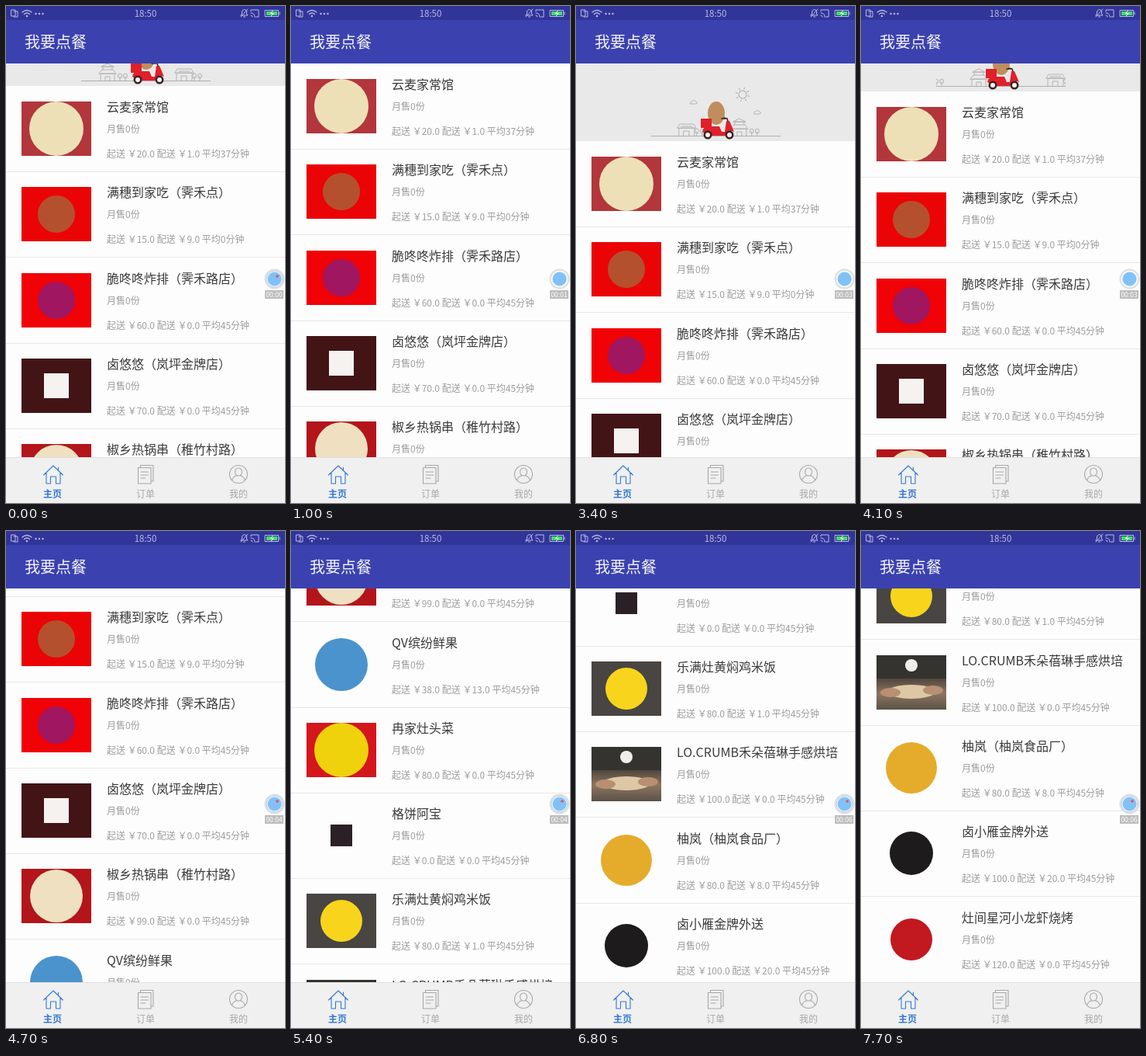
These frames come from a looping animation (360 by 640 pixels, 8 s). An HTML page with a canvas:

```html
<!DOCTYPE html>
<html lang="zh-CN">
<head>
<meta charset="utf-8">
<style>
html, body { margin: 0; width: 100%; height: 100%; overflow: hidden; background: #fdfdfd; }
canvas { display: block; width: 360px; height: 640px; }
</style>
</head>
<body>
<canvas id="stage" width="360" height="640"></canvas>
<script>
const ctx = document.getElementById('stage').getContext('2d');
const FONT = '"Noto Sans CJK SC", "Noto Sans CJK", sans-serif';
const LOOP = 8000, STEP = 100;
const TOP = 74, BOTTOM = 581, PITCH = 110.3;

// mark: [shape, colour, radius]
const shops = [
  { name: '云麦家常馆', fee: [20, 1, 37], bg: '#b2363c', mark: ['circle', '#eee0b6', 35] },
  { name: '满穗到家吃（霁禾点）', fee: [15, 9, 0], bg: '#ea0406', mark: ['circle', '#b5502f', 24] },
  { name: '脆咚咚炸排（霁禾路店）', fee: [60, 0, 45], bg: '#f00206', mark: ['circle', '#a01660', 24] },
  { name: '卤悠悠（岚坪金牌店）', fee: [70, 0, 45], bg: '#431416', mark: ['square', '#f6f2f0', 16] },
  { name: '椒乡热锅串（稚竹村路）', fee: [99, 0, 45], bg: '#b3151b', mark: ['circle', '#eee0c0', 34] },
  { name: 'QV缤纷鲜果', fee: [38, 13, 45], mark: ['circle', '#4b93cc', 34] },
  { name: '冉家灶头菜', fee: [80, 0, 45], bg: '#d5161c', mark: ['circle', '#efd20c', 35] },
  { name: '格饼阿宝', fee: [0, 0, 45], mark: ['square', '#2b2026', 14] },
  { name: '乐满灶黄焖鸡米饭', fee: [80, 1, 45], bg: '#484543', mark: ['circle', '#f8d51c', 27] },
  { name: 'LO.CRUMB禾朵蓓琳手感烘培', fee: [100, 0, 45], photo: true },
  { name: '柚岚（柚岚食品厂）', fee: [80, 8, 45], mark: ['circle', '#e5ac2b', 33] },
  { name: '卤小雁金牌外送', fee: [100, 20, 45], mark: ['circle', '#1d1b1b', 28] },
  { name: '灶间星河小龙虾烧烤', fee: [120, 0, 45], mark: ['circle', '#c2181f', 27] }
];

// [seconds, pixels]
const pullKeys = [[0, 29], [.1, 20], [.2, 11], [.3, 5], [.5, 0], [2.3, 0], [2.4, 14], [2.6, 62],
  [2.8, 94], [3, 104], [3.2, 100], [3.8, 100], [4, 60], [4.2, 12], [4.3, 0]];
const scrollKeys = [[4.55, 0], [4.6, 30], [4.7, 100], [4.85, 232], [5, 335], [5.2, 436], [5.4, 509],
  [5.6, 561], [5.8, 597], [6, 623], [6.2, 641], [6.4, 662], [6.6, 745], [6.9, 840], [7.3, 905], [7.7, 927]];

function track(keys, t) {
  if (t <= keys[0][0]) return keys[0][1];
  for (let i = 1; i < keys.length; i++) {
    const [t0, a] = keys[i - 1], [t1, b] = keys[i];
    if (t <= t1) return a + (b - a) * (t - t0) / (t1 - t0);
  }
  return keys[keys.length - 1][1];
}

function rect(x, y, w, h, color) {
  ctx.fillStyle = color;
  ctx.fillRect(x, y, w, h);
}

function ellipse(x, y, rx, ry, color) {
  ctx.fillStyle = color;
  ctx.beginPath();
  ctx.ellipse(x, y, rx, ry, 0, 0, Math.PI * 2);
  ctx.fill();
}

const disc = (x, y, r, color) => ellipse(x, y, r, r, color);

function stroke(path, color, width = 1, x = 0, y = 0) {
  ctx.save();
  ctx.translate(x, y);
  ctx.strokeStyle = color;
  ctx.lineWidth = width;
  ctx.lineCap = ctx.lineJoin = 'round';
  ctx.stroke(new Path2D(path));
  ctx.restore();
}

function text(str, x, y, size, color, align = 'left', weight = 400) {
  ctx.font = `${weight} ${size}px ${FONT}`;
  ctx.textAlign = align;
  ctx.fillStyle = color;
  ctx.fillText(str, x, y);
}

function drawPhoto(x, y) {
  rect(x, y, 90, 70, '#35332f');
  const tone = ctx.createLinearGradient(0, y + 28, 0, y + 70);
  tone.addColorStop(0, '#4a4039');
  tone.addColorStop(.5, '#8c7561');
  tone.addColorStop(1, '#5c5148');
  rect(x, y + 30, 90, 40, tone);
  ellipse(x + 45, y + 47, 31, 9, '#dcc8a4');
  ellipse(x + 18, y + 48, 13, 6, '#b98f72');
  ellipse(x + 73, y + 45, 13, 6, '#b98f72');
  disc(x + 45, y + 13, 8, '#f0eeea');
}

function drawThumb(shop, x, y) {
  if (shop.photo) return drawPhoto(x, y);
  if (shop.bg) rect(x, y, 90, 70, shop.bg);
  const [shape, color, r] = shop.mark;
  if (shape === 'circle') disc(x + 45, y + 35, r, color);
  else rect(x + 45 - r, y + 35 - r, r * 2, r * 2, color);
}

function drawShop(shop, y, loaded) {
  if (loaded) drawThumb(shop, 20, y);
  const [min, delivery, minutes] = shop.fee;
  text(shop.name, 130, y + 13, 16, '#3a3a3a');
  text('月售0份', 130, y + 40, 12, '#9c9c9c');
  text(`起送 ￥${min.toFixed(1)} 配送 ￥${delivery.toFixed(1)} 平均${minutes}分钟`, 130, y + 72, 12, '#9c9c9c');
  rect(0, y + 90, 360, 1, '#e8e8e8');
}

function drawScenery(x, ground) {
  const line = '#b4b4b4';
  stroke('M-9 0V-9H9V0M-11 -9L-7 -14H7L11 -9ZM-6 -14V-18H6V-14M-8 -18L0 -22L8 -18ZM-3 0V-5H3V0', line, 1, x, ground);
  stroke('M-10 0V-10H10V0M-12 -10L-9 -15H9L12 -10ZM-4 0V-6H3V0M-7 -12H7', line, 1, x + 99, ground);
  for (const dx of [16, 23, 112, 119]) {
    stroke('M0 0V-5M-2.5 -6A2.5 3 0 1 1 2.5 -6A2.5 3 0 1 1 -2.5 -6', line, 1, x + dx, ground);
  }
  const cloud = 'M-4 2H4A2 2 0 0 0 3 -1A3 3 0 0 0 -2 -1A2 2 0 0 0 -4 2';
  stroke(cloud, line, 1, x + 108, ground - 43);
  stroke(cloud, line, 1, x + 23, ground - 30);
}

function drawSun(x, y, turn) {
  ctx.save();
  ctx.translate(x, y);
  ctx.rotate(turn);
  stroke('M5 0A5 5 0 1 1 -5 0A5 5 0 1 1 5 0', '#aaa');
  for (let i = 0; i < 8; i++) {
    stroke('M7 0H9', '#aaa');
    ctx.rotate(Math.PI / 4);
  }
  ctx.restore();
}

function drawScooter(y) {
  ellipse(181, y - 36, 11, 15, '#c08d5e');
  stroke('M191 -30L195 -29L200 -13M188 -29H193', '#3a2222', 1.6, 0, y);
  ctx.fillStyle = '#e0202b';
  ctx.fill(new Path2D(`M163 ${y - 12}Q164 ${y - 19} 172 ${y - 19}H185L188 ${y - 12}H192L194 ${y - 26}H198L204 ${y - 12}L199 ${y - 14}L192 ${y - 7}H172Z`));
  rect(161, y - 29, 14, 12, '#e0202b');
  for (const x of [170, 198]) {
    disc(x, y - 8, 5.5, '#3a2222');
    disc(x, y - 8, 3, '#f4f4f4');
  }
}

function drawBanner(t, pull) {
  if (pull <= 0) return;
  const edge = TOP + pull, ground = edge - 7;
  rect(0, TOP, 360, pull, '#e9e9e9');
  ctx.save();
  ctx.beginPath();
  ctx.rect(97, TOP, 167, pull);
  ctx.clip();
  const start = t < 1 ? 131 - 84 * t : 111 - 84 * (t - 2.6);
  const x = 97 + (((start - 97) % 167) + 167) % 167;
  for (const shift of [-167, 0, 167]) drawScenery(x + shift, ground);
  drawSun(215, edge - 60, t);
  stroke(`M97 ${ground + .5}H264`, '#b0b0b0');
  ctx.restore();
  drawScooter(edge);
}

function drawHeader() {
  rect(0, 0, 360, TOP, '#3b42b0');
  rect(0, 0, 360, 18, '#31359a');
  text('我要点餐', 24, 53.5, 20, '#f4f4fb');
  const pale = '#babce0';
  text('18:50', 180, 14, 11.5, pale, 'center');
  stroke('M7 5H12V13H7ZM10 7H15V14H10', pale, 1);
  stroke('M21 8Q27 3 33 8M23.5 10.5Q27 7.5 30.5 10.5', pale, 1.3);
  disc(27, 13, 1.3, pale);
  for (const x of [38.5, 43, 47.5]) disc(x, 10, 1.2, pale);
  stroke('M303 12H312L310.500 10V7Q307.500 2 304.500 7V10ZM306.500 14H308.500M303 14L312 4', pale, 1);
  stroke('M316 7V5H326V14H322M316 9Q321 9 321 14M316 12Q318 12 318 14', pale, 1);
  stroke('M334.500 5.500H351.500V13.500H334.500ZM353 8V11', pale, 1);
  rect(336, 7, 14, 5, '#43dc6b');
  stroke('M344 6.500L341.500 9.500H345L342.500 12.500', '#fff', 1);
}

function drawTabs() {
  rect(0, BOTTOM, 360, 59, '#f0f0f0');
  rect(0, BOTTOM, 360, 1, '#e2e2e2');
  const blue = '#3478d8', grey = '#a8a8a8';
  stroke('M48.500 604L61 592L73.500 604M52 601V615H57.500V606H64.500V615H70V601M67.500 594V598', blue, 1.1);
  stroke('M173.500 594V591.500H190V612H187.500M170.500 594.500H187V615H170.500ZM174 600H183.500M174 604H183.500M174 608H180', grey, 1.1);
  stroke('M311.500 603A11.500 11.500 0 1 1 288.500 603A11.500 11.500 0 1 1 311.500 603M304.500 600A4.500 5 0 1 1 295.500 600A4.500 5 0 1 1 304.500 600M291.500 611Q293 606 297 605M308.500 611Q307 606 303 605', grey, 1.1);
  text('主页', 60, 632.5, 12, blue, 'center', 700);
  text('订单', 180, 632.5, 12, grey, 'center');
  text('我的', 300, 632.5, 12, grey, 'center');
}

function drawRecorder(t) {
  const second = Math.floor((t - .85) / 1.15) + 1;
  disc(346.5, 351.5, 13, '#dcdee0');
  disc(346.5, 351.5, 11, '#f4f6f8');
  disc(346.5, 351.5, 9, '#80c2f7');
  if (second % 2 === 0) {
    stroke('M357 351.500A10.500 10.500 0 1 1 336 351.500A10.500 10.500 0 1 1 357 351.500', '#b9cfe2', 1);
    disc(350, 348, 1.8, '#e8505a');
  }
  rect(334, 366, 24, 11, '#bdbdbd');
  text('00:0' + second, 346, 374.8, 8.5, '#fff', 'center');
}

function draw(t) {
  const pull = Math.round(track(pullKeys, t));
  const first = 94 + pull - track(scrollKeys, t);
  rect(0, 0, 360, 640, '#fdfdfd');
  ctx.save();
  ctx.beginPath();
  ctx.rect(0, TOP, 360, BOTTOM - TOP);
  ctx.clip();
  drawBanner(t, pull);
  shops.forEach((shop, i) => {
    const y = Math.round(first + i * PITCH);
    if (y > TOP - 95 && y < BOTTOM) drawShop(shop, y, i < 10 || t > 6.3);
  });
  ctx.restore();
  drawHeader();
  drawTabs();
  drawRecorder(t);
}

function tick() {
  const ms = performance.now() % LOOP;
  draw(Math.floor(ms / STEP) * STEP / 1000);
  requestAnimationFrame(tick);
}
tick();
</script>
</body>
</html>
```
